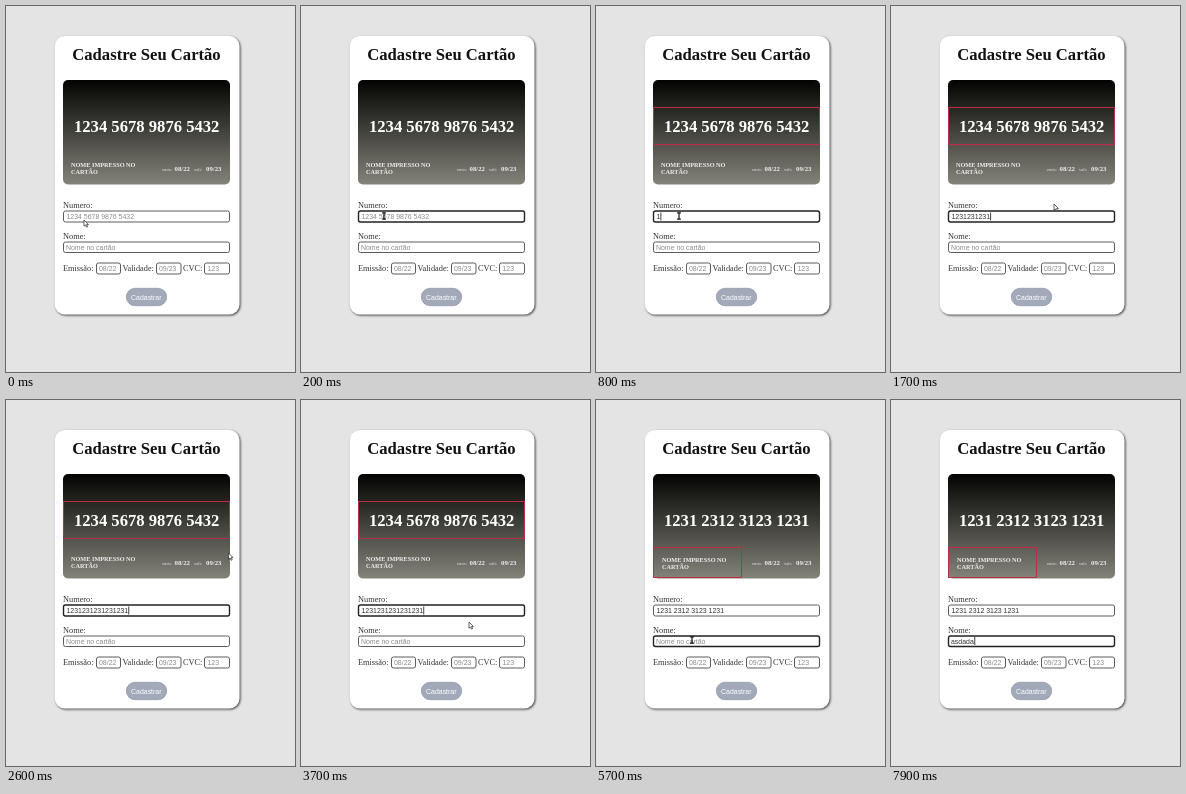
An HTML page that plays this animation: 289 px wide and 366 px high, repeating every 8000 ms.

```html
<!DOCTYPE html>
<html lang="pt-BR">
<head>
<meta charset="utf-8">
<title>Cadastre Seu Cartão</title>
<style>
  html, body { margin: 0; width: 100%; height: 100%; overflow: hidden; background: #e4e4e4; }
  svg { display: block; width: 289px; height: 366px; }
  text { font-family: "Liberation Serif", "Times New Roman", serif; font-size: 8.32px; fill: #333; white-space: pre; }
  .title { font-size: 16.64px; font-weight: bold; fill: #111; }
  .number { font-size: 16.64px; font-weight: bold; fill: #fff; }
  .print { font-size: 6.24px; font-weight: bold; fill: #eee; }
  .date { font-size: 6.8px; font-weight: bold; fill: #eee; }
  .tiny { font-size: 4.6px; fill: #e4e4e4; }
  .value, .button { font-family: "Liberation Sans", Arial, sans-serif; font-size: 6.95px; }
  .hint { fill: #8c8c8c; }
  .button { fill: #fff; }
  .field { fill: #fff; stroke: #5c5c5c; stroke-width: 1; }
  .field.active { stroke: #222; stroke-width: 1.4; }
  .mark { fill: none; stroke: #bd2c45; stroke-width: 1; }
  .form { filter: drop-shadow(1.4px 1.4px .9px #444); }
</style>
</head>
<body>
<svg viewBox="0 0 289 366">
  <defs>
    <linearGradient id="shade" x2="0" y2="1">
      <stop stop-color="#030301"/>
      <stop offset="1" stop-color="#84837a"/>
    </linearGradient>
  </defs>

  <rect class="form" x="48.7" y="30" width="184.8" height="278.5" rx="10" fill="#fff"/>
  <text class="title" x="140.5" y="54" text-anchor="middle">Cadastre Seu Cartão</text>

  <rect x="57" y="74" width="167" height="104.5" rx="5" fill="url(#shade)"/>
  <text class="number" id="cardNumber" x="140.7" y="126" text-anchor="middle"></text>
  <g id="cardName">
    <text class="print" x="65" y="161">NOME IMPRESSO NO</text>
    <text class="print" x="65" y="168.3">CARTÃO</text>
  </g>
  <text class="tiny" x="156" y="165">emis:</text>
  <text class="date" x="168.5" y="165">08/22</text>
  <text class="tiny" x="188" y="165">vali:</text>
  <text class="date" x="200" y="165">09/23</text>
  <rect class="mark" id="numberMark" x="57.5" y="101.5" width="166" height="37"/>
  <rect class="mark" id="nameMark" x="57.5" y="147.5" width="88" height="30"/>

  <text x="57" y="202">Numero:</text>
  <rect class="field" id="numberField" x="57.5" y="205" width="166" height="11" rx="2"/>
  <text class="value" id="numberValue" x="60.5" y="213"></text>
  <text x="57" y="233">Nome:</text>
  <rect class="field" id="nameField" x="57.5" y="236" width="166" height="10.5" rx="2"/>
  <text class="value" id="nameValue" x="60" y="243.5"></text>

  <text x="57" y="265">Emissão:</text>
  <rect class="field" x="90.5" y="257" width="24" height="11" rx="2"/>
  <text class="value hint" x="93" y="265">08/22</text>
  <text x="116.5" y="265">Validade:</text>
  <rect class="field" x="150.5" y="257" width="24.5" height="11" rx="2"/>
  <text class="value hint" x="153" y="265">09/23</text>
  <text x="177" y="265">CVC:</text>
  <rect class="field" x="198.5" y="257" width="25" height="11" rx="2"/>
  <text class="value hint" x="201.5" y="265">123</text>

  <rect x="120.3" y="282.3" width="40.4" height="17.4" rx="8.7" fill="#a2aaba" stroke="#8e96a6" stroke-width=".7"/>
  <text class="button" x="140.3" y="293.5" text-anchor="middle">Cadastrar</text>

  <path id="caret" d="M0 0V8" stroke="#111" stroke-width=".8"/>
  <path id="arrow" d="M0 0V6.2L1.5 5L2.6 7.2L3.6 6.7L2.6 4.5H4.4Z" fill="#fff" stroke="#222" stroke-width=".7"/>
  <path id="beam" d="M-1.9-3.2H1.9M0-3.2V3.2M-1.9 3.2H1.9" fill="none" stroke="#111" stroke-width="1.2"/>
</svg>
<script>
const LOOP = 8000;
const NUMBER_FOCUS = 200, NUMBER_MARK = 300, NUMBER_BLUR = 3800;
const NAME_FOCUS = 5200, NAME_START = 7200;
const DIGITS = "1231231231231231";
const NAME_KEYS = [7200, 7300, 7400, 7500, 7600, 7800];
const NAME = "asdada";
// Pointer stops: time, x, y
const STOPS = [
  [0, 78, 214], [200, 83, 210], [1000, 83, 210], [1700, 163, 198],
  [2300, 259, 170], [2700, 216, 150], [3100, 168, 222], [4400, 168, 222],
  [4900, 112, 233], [5100, 100, 239], [5300, 96, 240]
];

const $ = id => document.getElementById(id);
const show = (id, visible) => $(id).style.display = visible ? "" : "none";
const place = (id, x, y) => $(id).setAttribute("transform", `translate(${x} ${y})`);
const activate = (id, active) => $(id).classList.toggle("active", active);
const group = digits => digits.replace(/(.{4})(?=.)/g, "$1 ");

function setText(id, text) {
  if ($(id).textContent !== text) $(id).textContent = text;
}

function setField(id, text, hint) {
  setText(id, text || hint);
  $(id).classList.toggle("hint", !text);
}

function pointerAt(t) {
  const next = STOPS.findIndex(stop => stop[0] > t);
  if (next < 0) return STOPS[STOPS.length - 1].slice(1);
  const [t0, x0, y0] = STOPS[next - 1], [t1, x1, y1] = STOPS[next];
  const k = (t - t0) / (t1 - t0), ease = k * k * (3 - 2 * k);
  return [x0 + (x1 - x0) * ease, y0 + (y1 - y0) * ease];
}

function drawCaret(t, valueId, y, typed, lastKey) {
  const length = typed ? $(valueId).getComputedTextLength() : 0;
  place("caret", 61 + length, y);
  show("caret", Math.floor((t - lastKey) / 500) % 2 === 0);
}

function drawPointer(t) {
  const [x, y] = pointerAt(t);
  const inField = x > 57 && x < 224 && (y > 204 && y < 213 || y > 235 && y < 247);
  const overText = inField && t >= 100;
  const visible = t < NAME_START;
  place("arrow", x, y);
  place("beam", x, y);
  show("arrow", visible && !overText);
  show("beam", visible && overText);
}

function draw(t) {
  const digits = DIGITS.slice(0, Math.max(0, Math.floor((t - 700) / 100)));
  const numberDone = t >= NUMBER_BLUR;
  const numberMarked = t >= NUMBER_MARK && !numberDone;
  const nameFocused = t >= NAME_FOCUS;
  const keys = NAME_KEYS.filter(time => time <= t);

  setText("cardNumber", numberDone ? group(DIGITS) : "1234 5678 9876 5432");
  setField("numberValue", numberDone ? group(DIGITS) : digits, "1234 5678 9876 5432");
  setField("nameValue", NAME.slice(0, keys.length), "Nome no cartão");

  show("numberMark", numberMarked);
  show("nameMark", nameFocused);
  place("cardName", nameFocused ? 1 : 0, nameFocused ? .6 : 0);
  activate("numberField", t >= NUMBER_FOCUS && !numberDone);
  activate("nameField", nameFocused);

  if (numberMarked) {
    const lastKey = digits ? Math.min(2300, Math.floor(t / 100) * 100) : NUMBER_MARK;
    drawCaret(t, "numberValue", 206.5, digits, lastKey);
  } else if (nameFocused) {
    drawCaret(t, "nameValue", 237, keys.length, keys[keys.length - 1] || NAME_FOCUS);
  } else {
    show("caret", false);
  }
  drawPointer(t);
}

const start = performance.now();
function tick() {
  draw((performance.now() - start) % LOOP);
  requestAnimationFrame(tick);
}
tick();
</script>
</body>
</html>
```
